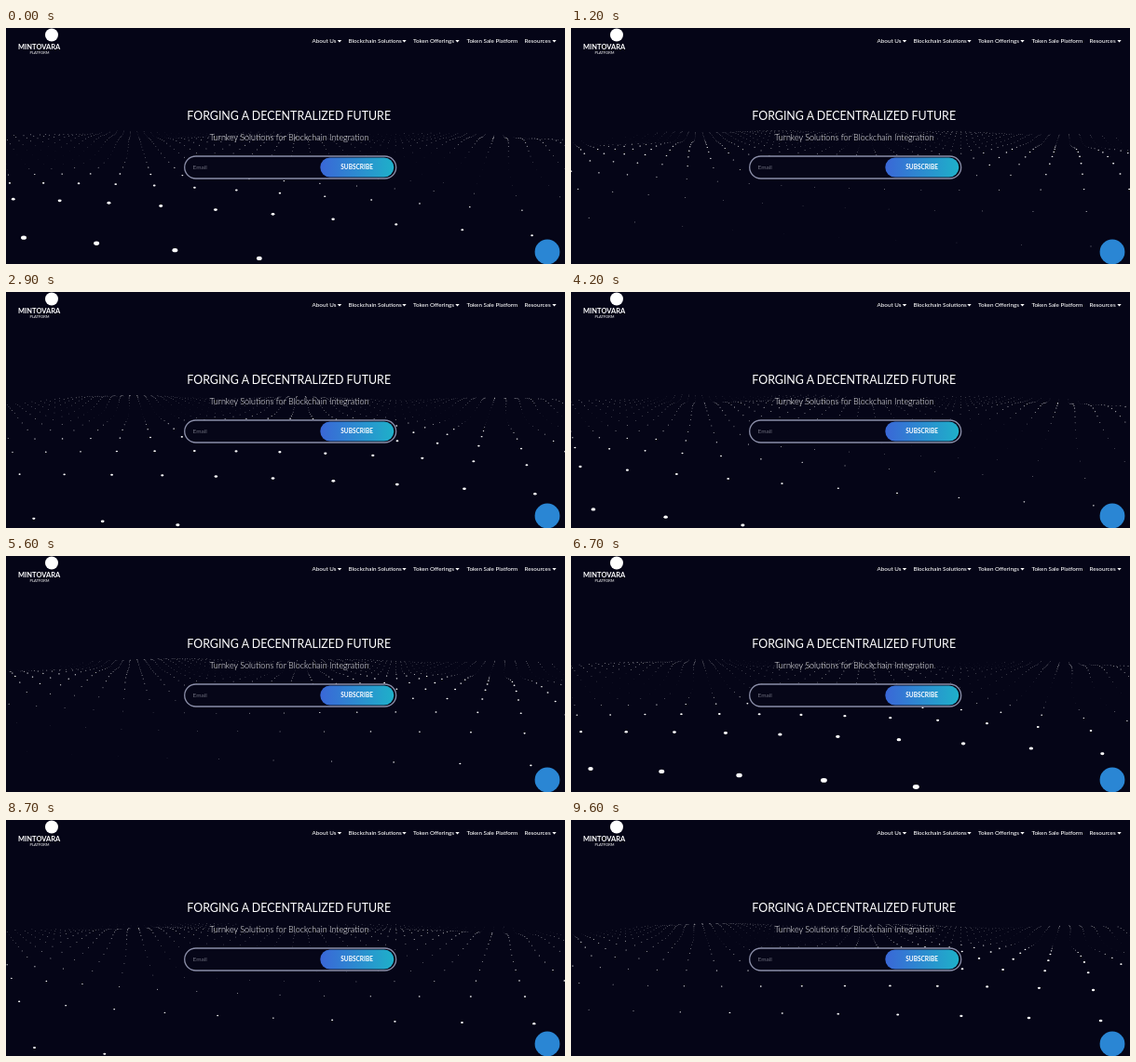
An HTML page with a canvas that plays this animation: 600x254 px, repeating every 9.7 s.

```html
<!DOCTYPE html>
<html lang="en">
<head>
<meta charset="utf-8">
<title>Forging a decentralized future</title>
<style>
  html, body { margin: 0; width: 100%; height: 100%; overflow: hidden; background: #050517; }
  canvas, svg { position: absolute; left: 0; top: 0; width: 600px; height: 254px; }
  text { font-family: Lato, sans-serif; fill: #fff; }
  .nav { font-size: 6.3px; font-weight: 500; }
  .mid { text-anchor: middle; }
</style>
</head>
<body>
<canvas id="waves" width="600" height="254"></canvas>
<svg viewBox="0 0 600 254">
  <defs>
    <linearGradient id="blue">
      <stop offset="0" stop-color="#3a67d7"/>
      <stop offset="1" stop-color="#1eb0c9"/>
    </linearGradient>
  </defs>

  <circle cx="49" cy="7.5" r="7" fill="#fff"/>
  <text x="13" y="22.6" font-size="7.5" font-weight="700">MINTOVARA</text>
  <text x="25.5" y="28.3" font-size="4">PLATFORM</text>

  <g class="nav">
    <text x="328.5" y="16.2">About Us</text>
    <text x="367.5" y="16.2">Blockchain Solutions</text>
    <text x="437" y="16.2">Token Offerings</text>
    <text x="494.5" y="16.2">Token Sale Platform</text>
    <text x="556.5" y="16.2">Resources</text>
  </g>
  <path fill="#fff" d="M355.8 13h4.4l-2.2 2.6zM425.3 13h4.4l-2.2 2.6zM482.3 13h4.4l-2.2 2.6zM586.3 13h4.4l-2.2 2.6z"/>

  <text class="mid" x="303.7" y="99.3" font-size="12.4">FORGING A DECENTRALIZED FUTURE</text>
  <text class="mid" x="304" y="120.6" font-size="9.05" font-weight="300">Turnkey Solutions for Blockchain Integration</text>

  <rect x="191.7" y="138" width="227" height="24" rx="12" fill="#060618" stroke="#8b8ea8" stroke-width="1.3"/>
  <text x="200.5" y="152.4" font-size="6.5" style="fill:#6c6d7c">Email</text>
  <rect x="337.3" y="139.5" width="79" height="21" rx="10.5" fill="url(#blue)"/>
  <text class="mid" x="376.6" y="152.3" font-size="6.5" font-weight="700">SUBSCRIBE</text>

  <circle cx="581" cy="241" r="13.4" fill="#2a86d4"/>
</svg>
<script>
const LOOP = 9700, STEP = 100;
const COLS = 50, ROWS = 35, GAP = 200, AMP = 30;
const FOCAL = 183.5, MID_X = 300, MID_Y = 160.3;
const SPEED = 5.72;
const ctx = document.getElementById('waves').getContext('2d');

// Camera looks at the origin
const cam = [85, 342, 1000];
const unit = v => v.map(n => n / Math.hypot(...v));
const dot = (a, b) => a[0] * b[0] + a[1] * b[1] + a[2] * b[2];
const cross = (a, b) => [
  a[1] * b[2] - a[2] * b[1],
  a[2] * b[0] - a[0] * b[2],
  a[0] * b[1] - a[1] * b[0]
];
const fwd = unit(cam.map(n => -n));
const right = unit(cross(fwd, [0, 1, 0]));
const up = cross(right, fwd);

function draw(time) {
  const count = SPEED * time / 1000;
  ctx.clearRect(0, 0, 600, 254);
  ctx.fillStyle = '#fff';
  for (let i = 0; i < COLS; i++) {
    const col = i - COLS / 2;
    const sx = Math.sin(0.3 * (col + count) + 2.68);
    for (let j = 0; j < ROWS; j++) {
      const row = j - ROWS / 2;
      const sz = Math.sin(0.5 * (row - 2.5 + count) + 0.9);
      const d = [col * GAP - cam[0], AMP * (sx + sz) - cam[1], row * GAP - cam[2]];
      const depth = dot(d, fwd);
      if (depth < 20) continue;
      const k = FOCAL / depth;
      const size = 4 * (sx + sz + 2) * k;
      const x = MID_X + k * dot(d, right);
      const y = MID_Y - k * dot(d, up);
      ctx.beginPath();
      ctx.ellipse(x, y, 0.43 * size + 0.08, 0.3 * size + 0.08, 0, 0, 2 * Math.PI);
      ctx.fill();
    }
  }
}

let last = -1;
function tick() {
  const time = Math.floor(performance.now() % LOOP / STEP) * STEP;
  if (time !== last) draw(last = time);
  requestAnimationFrame(tick);
}
tick();
</script>
</body>
</html>
```
